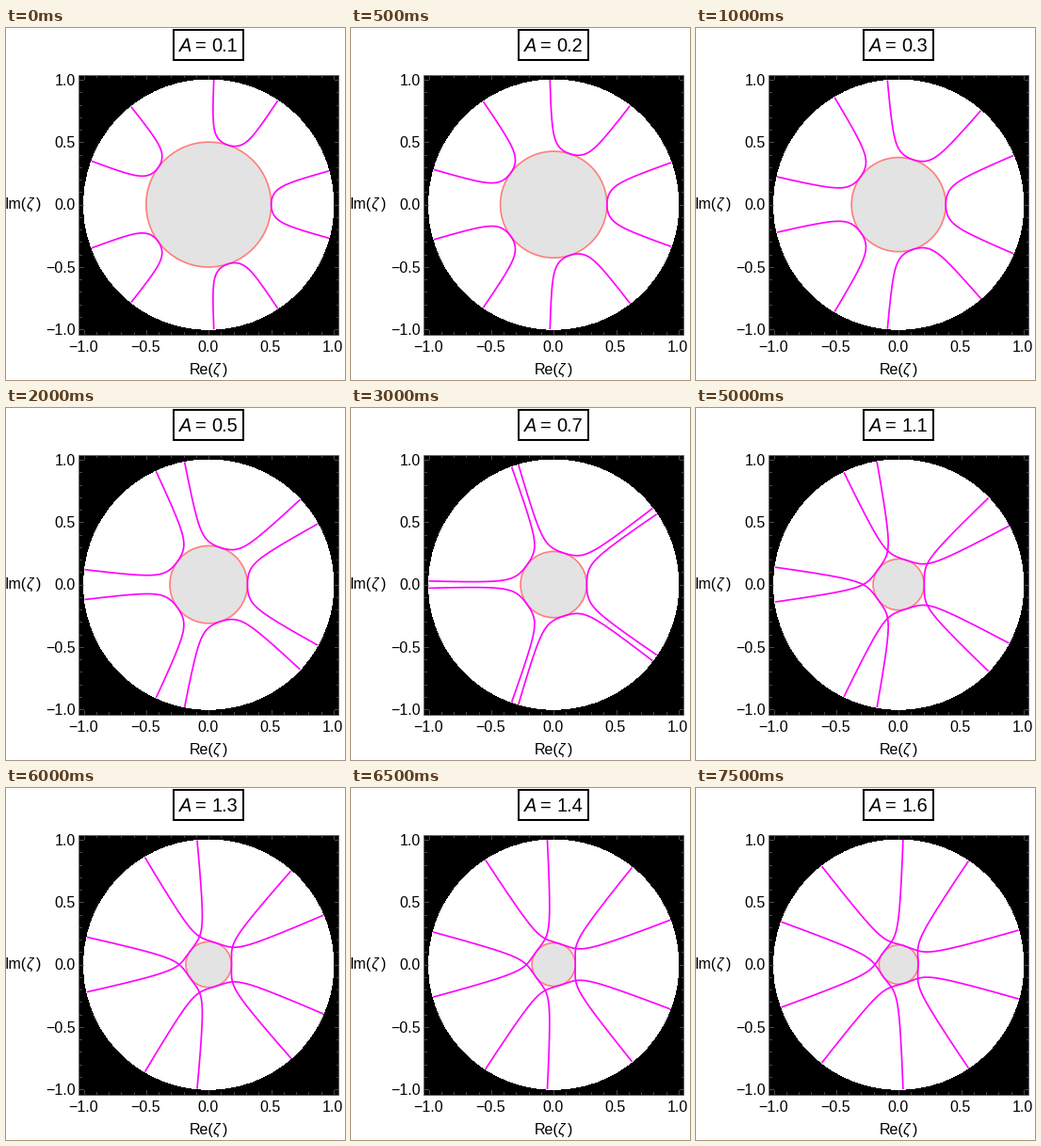
A matplotlib script that plays this animation: 360x374 px, repeating every 8 s.

```python
import numpy as np
import matplotlib.pyplot as plt
from matplotlib.animation import FuncAnimation
from matplotlib.patches import Circle, Rectangle

W, H, DPI = 360, 374, 100
CX, CY, R = 215.2, 187.6, 132.6
HALF = 138
FRAMES, INTERVAL = 16, 500
PX = 72 / DPI
FLAT = 5.2  # how quickly the arms straighten away from the core

plt.rcParams["font.family"] = ["Liberation Sans", "DejaVu Sans"]

fig = plt.figure(figsize=(W / DPI, H / DPI), dpi=DPI, facecolor="white")
ax = fig.add_axes([0, 0, 1, 1])
ax.set_xlim(0, W)
ax.set_ylim(H, 0)
ax.axis("off")


def label(x, y, s, size=16, ha="left", style="normal"):
    return ax.text(x, y, s, fontsize=size * PX, ha=ha, va="baseline",
                   style=style, color="black", zorder=10)


def segment(x, y, color="#5c5c5c"):
    ax.plot(x, y, color=color, lw=0.8 * PX, zorder=4)


# Black plot area with the white unit disc
ax.add_patch(Rectangle((CX - HALF, CY - HALF), 2 * HALF, 2 * HALF,
                       fc="black", ec="#5c5c5c", lw=0.8 * PX, zorder=1))
ax.add_patch(Circle((CX, CY), R, fc="white", ec="none",
                    antialiased=False, zorder=2))

# Inward ticks on all four sides
for k in range(-10, 11):
    d = k / 10 * R
    size = 4.5 if k % 5 == 0 else 2.6
    for side in (-1, 1):
        a, b = side * HALF, side * (HALF - size)
        segment([CX + d] * 2, [CY + a, CY + b])
        segment([CX + a, CX + b], [CY + d] * 2)

# Tick and axis labels
for v in (-1, -0.5, 0, 0.5, 1):
    s = f"{v:.1f}".replace("-", "\u2212")
    label(CX + v * R - 0.7, 344, s, ha="center")
    label(74, CY - v * R + 5.6, s, ha="right")

for x, y, name, step in ((194.5, 368, "Re(", 25.5), (-1, 192, "Im(", 22.5)):
    label(x, y, name)
    label(x + step, y, "\u03b6", style="italic")
    label(x + step + 10, y, ")")

# Framed title
BOX_X, BOX_W = 178, 74
box = ax.add_patch(Rectangle((BOX_X, 2), BOX_W, 32, fc="white", ec="black",
                             lw=2 * PX, zorder=9))
title = [(label(x, 25, s, 20, style=style), x)
         for x, s, style in ((184, "A", "italic"), (201, "=", "normal"),
                             (218.3, "", "normal"))]

core = ax.add_patch(Circle((CX, CY), 1, fc="#e3e3e3", ec="#ff8080",
                           lw=1.7 * PX, zorder=5))
arms = [ax.plot([], [], color="#ff00ff", lw=1.7 * PX, zorder=6,
                solid_capstyle="butt")[0] for _ in range(5)]

T = np.linspace(-np.pi / 2, np.pi / 2, 241)


def arm(A):
    """Polar curve of one arm: touches the core at angle 0, ends on r = 1."""
    depth = 0.305 + 1.222 * np.sqrt(A)
    spread = np.arccos(0.937 - 0.82 * A) / 2
    v = np.cos(T)
    u = (np.cosh(FLAT * v) - 1) / (np.cosh(FLAT) - 1)
    theta = spread * np.sign(T) * np.sqrt(np.clip(1 - u, 0, 1))
    return np.exp(-depth * v), theta, np.exp(-depth)


def update(i):
    A = (i + 1) / 10
    r, theta, r0 = arm(A)
    core.set_radius(r0 * R)
    for k, line in enumerate(arms):
        phi = theta + 2 * np.pi * k / 5
        line.set_data(CX + R * r * np.cos(phi), CY - R * r * np.sin(phi))

    # A whole number loses its last digit, so the frame narrows
    whole = (i + 1) % 10 == 0
    shift = 5.5 if whole else 0
    box.set_x(BOX_X + shift)
    box.set_width(BOX_W - 2 * shift)
    for text, x in title:
        text.set_x(x + shift)
    title[-1][0].set_text(f"{A:.0f}." if whole else f"{A:.1f}")
    return [core, box, *arms, *(text for text, _ in title)]


anim = FuncAnimation(fig, update, frames=FRAMES, interval=INTERVAL,
                     repeat=True, repeat_delay=0, blit=False)
plt.show()
```
